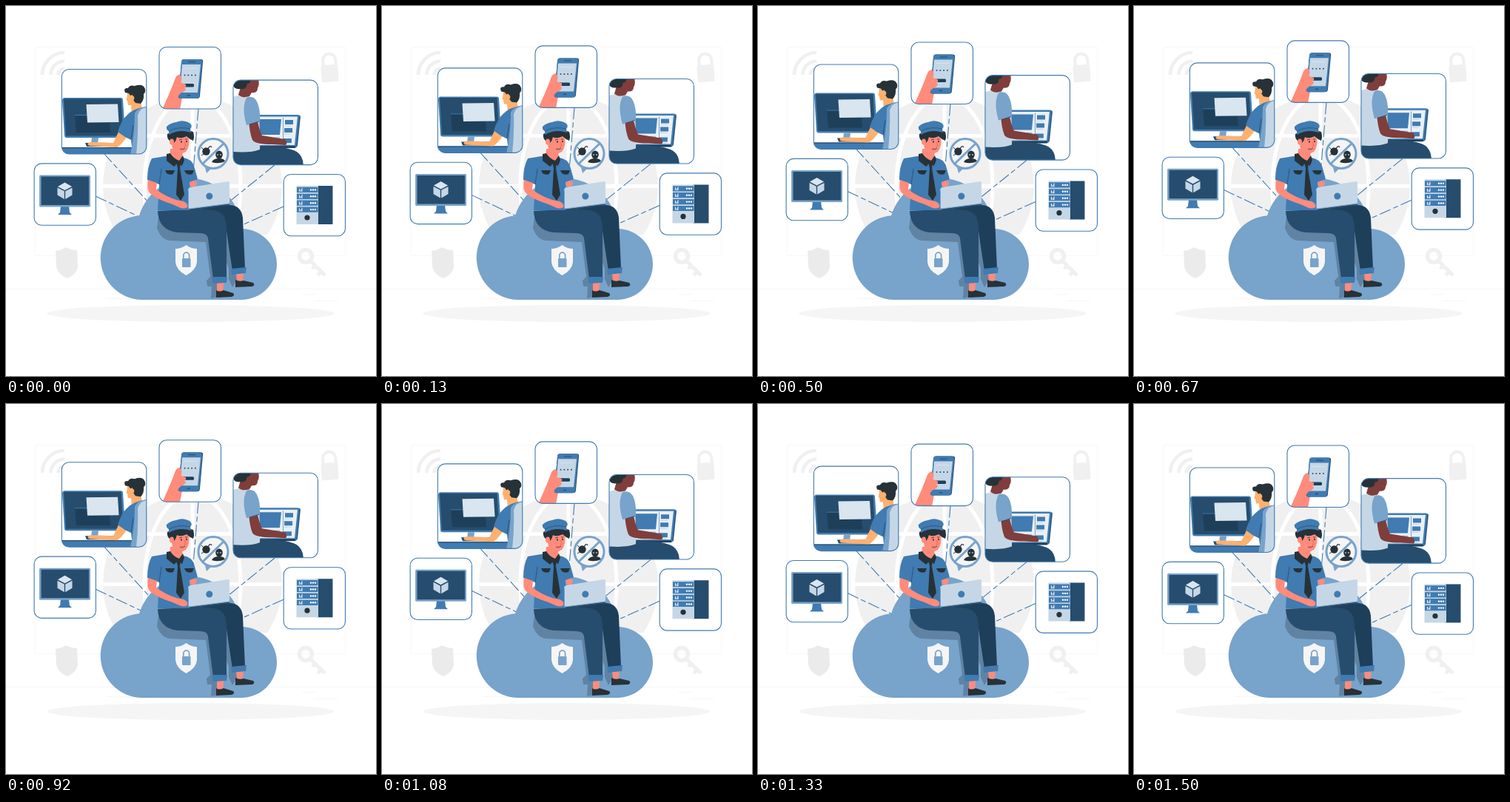
Animation, 500 px wide and 500 px high, one loop 1.54 s. Source, as an HTML page with a canvas:

```html
<!DOCTYPE html>
<html lang="en">
<head>
<meta charset="utf-8">
<style>
html, body { margin: 0; width: 100%; height: 100%; overflow: hidden; background: #fff; }
canvas { display: block; width: 500px; height: 500px; }
</style>
</head>
<body>
<canvas id="stage" width="500" height="500"></canvas>
<script>
const ctx = document.getElementById('stage').getContext('2d');
const LOOP = 1540, FRAME = 1000 / 24, RISE = 10, PEAK = 720;
const blue = '#407bb1', sky = '#78a3ca', pale = '#c5d7e6', mist = '#d9e5ef', navy = '#264d6d', deep = '#1e3f5a';
const ink = '#263238', skin = '#ff8b7b', tan = '#ffb06f', brown = '#7f3e3b', gray = '#ebebeb', faint = '#f0f0f0';

function fill(color, d) {
  ctx.fillStyle = color;
  ctx.fill(new Path2D(d));
}
function line(color, width, d, dash = []) {
  ctx.strokeStyle = color;
  ctx.lineWidth = width;
  ctx.setLineDash(dash);
  ctx.stroke(new Path2D(d));
}
function rect(color, x, y, w, h, r = 0) {
  ctx.fillStyle = color;
  ctx.beginPath();
  ctx.roundRect(x, y, w, h, r);
  ctx.fill();
}
function oval(color, x, y, rx, ry = rx) {
  ctx.fillStyle = color;
  ctx.beginPath();
  ctx.ellipse(x, y, rx, ry, 0, 0, Math.PI * 2);
  ctx.fill();
}
function ring(color, width, x, y, rx, ry = rx) {
  ctx.strokeStyle = color;
  ctx.lineWidth = width;
  ctx.setLineDash([]);
  ctx.beginPath();
  ctx.ellipse(x, y, rx, ry, 0, 0, Math.PI * 2);
  ctx.stroke();
}

function globe() {
  ctx.save();
  ctx.beginPath();
  ctx.arc(252, 243, 121, 0, Math.PI * 2);
  ctx.clip();
  rect(faint, 130, 120, 244, 244);
  line('#fff', 5, 'M252 120V366M130 243.5H374M130 175.5H374M130 311.5H374');
  ring('#fff', 5, 252, 243, 65, 121);
  ctx.restore();
}

function backdrop() {
  rect('#fff', 0, 0, 500, 500);
  line('#f8f8f8', 1, 'M39.5 55.5H458.5V337.5H39.5Z');
  line('#f6f6f6', 1, 'M0 382.5H500');
  line('#f6f6f6', 1, 'M135 395.5H180M400 389.5H419M416 398.5H448');
  oval('#f5f5f5', 249.5, 415.5, 194, 11.5);

  for (const r of [30, 18.5, 8.5])
    line(faint, 4.5, `M${79 - r} 93A${r} ${r} 0 0 1 79 ${93 - r}`);

  ctx.save();
  ctx.translate(437.5, 91);
  ctx.rotate(-0.07);
  rect(faint, -11.5, -11.5, 23, 23, 2);
  line(faint, 4, 'M-8 -10V-18A8.5 8.5 0 0 1 9 -18V-10');
  ctx.restore();

  fill(gray, 'M67 331Q75 330 81 326Q88 330 96 330L97 352Q96 362 83 368Q69 362 68 352Z');
  ring(faint, 5.5, 405, 338, 8.5);
  line(faint, 5, 'M411 344L431 364M418 351L414 355M426 359L421 364');
  globe();
}

function links() {
  const dash = [16, 4, 7, 4];
  line(blue, 1.1, 'M260 139L252 236', dash);
  line(blue, 1.1, 'M132 199L214 289', dash);
  line(blue, 1.1, 'M121 257L210 299', dash);
  line(blue, 1.1, 'M363 215L280 282', dash);
  line(blue, 1.1, 'M375 271L290 309', dash);
}

function panel(x, y, size, r, content) {
  const box = new Path2D();
  box.roundRect(x + .5, y + .5, size, size, r);
  ctx.fillStyle = '#fff';
  ctx.fill(box);
  ctx.save();
  ctx.clip(box);
  content();
  ctx.restore();
  ctx.strokeStyle = blue;
  ctx.lineWidth = 1.1;
  ctx.setLineDash([]);
  ctx.stroke(box);
}

function phone() {
  fill(skin, 'M211 140L219 122Q225 108 229 97Q232 92 236 93L239 106L243 114L238 124L235 140Z');
  fill(navy, 'M241 72H263Q267 72 266 76L262 121Q262 125 258 125H236Q232 125 233 121L237 76Q237 72 241 72Z');
  fill(blue, 'M240 72H262Q265 72 265 76L261 121Q261 125 257 125H236Q232 125 233 121L237 76Q237 72 240 72Z');
  fill(pale, 'M238 79H263L259 117H235Z');
  line(navy, 1, 'M246 75.5H256');
  line(navy, 1.3, 'M245 121H249');
  line(mist, 1, 'M241 84H258');
  for (let i = 0; i < 4; i++) oval(navy, 241.5 + i * 4.8, 93.5, 1);
  rect(deep, 239, 105, 15, 4.5, 1.5);
  fill(skin, 'M228 101Q231 92 236 94Q239 98 236 103L243 106Q244 109 241 110L243 112Q242 116 237 117L232 122Z');
}

function deskWorker() {
  rect(blue, 75, 191, 115, 10);
  line(deep, 1, 'M75 191.5H190');
  fill(blue, 'M79 124H155Q158 124 158 127L161 174Q161 178 157 178H82Q79 178 79 175L76 128Q76 124 79 124Z');
  fill(navy, 'M78 125.5H155.5L158.5 175.5H81Z');
  fill(deep, 'M93 147H139L141 171H95Z');
  line(blue, 1, 'M93 147.5H112');
  fill(mist, 'M108.5 133L151 132.5L152.5 157L110 157.5Z');
  fill(sky, 'M116 178H125L124 186H115Z');
  fill(navy, 'M107 185H149V190H109Z');
  fill(tan, 'M153 168L165 174Q157 187 150 191L113 189Q108 187 113 184L123 184L145 185Z');
  fill(tan, 'M164 117L163.5 123L162.5 127L164 128L165 134H169L170 147L184 140L180 117Z');
  fill(blue, 'M163 148Q172 138 190 136V200H171L169 181L161 177L151 170Q156 154 163 148Z');
  line(deep, .7, 'M169 180L172 161');
  fill(ink, 'M161 117Q158 110 165 111Q167 106 174 108Q185 104 188 112Q189 117 186 119Q187 127 182 132L175 131L172 127L171 120L168 121L166 118Z');
  oval(tan, 171, 124.5, 2.3, 3);
  fill(sky, 'M174 145Q179 136 191 136V201H168Q174 174 174 145Z');
  fill(pale, 'M178 148Q181 137 191 137V201H176Q179 174 178 148Z');
}

function laptopWorker() {
  fill(blue, 'M343 147H394Q398 147 398 150L394 189Q393 192 389 192H341Z');
  line(navy, 1, 'M397 149L393 189');
  fill('#e9f0f6', 'M341 149.5H394L390 188H340Z');
  fill(blue, 'M342 153H372L370 174H341Z');
  line(sky, 1, 'M374.5 151V187');
  for (const y of [154, 165, 179]) {
    const x = 377 - (y - 154) / 12;
    rect(blue, x, y, 11, 6);
    line(pale, 1, `M${x - 1} ${y + 8}h10`);
  }
  line(sky, 2.5, 'M363 178.5H370', [1.5, 1]);
  line(deep, 2.5, 'M345 190.5H391');
  fill(navy, 'M305 193Q326 187 354 190Q380 190 393 197Q402 203 402 217H305Z');
  fill(pale, 'M306 123Q317 119 328 122L340 133Q344 162 343 194Q330 199 306 197Z');
  fill(brown, 'M319 103Q329 93 341 99Q343 107 340 111Q340 118 332 117L329 122Q319 125 314 120Z');
  fill(ink, 'M306 97H331Q331 103 328 105Q325 104 325 109Q322 113 317 112Q308 113 307 107Z');
  fill(brown, 'M328 153L339 151Q342 167 346 175L377 180Q381 185 378 188L360 187Q337 187 333 181Q329 171 328 153Z');
  fill(sky, 'M325 124Q334 120 339 129Q344 139 343 156L325 161Q318 137 325 124Z');
  line(deep, .7, 'M329 160L342 156');
}

function monitor() {
  fill(blue, 'M74 270H85L86 279L89 282H70L73 279Z');
  rect(sky, 45, 228.5, 69, 43, 1.5);
  rect(navy, 47.5, 230.5, 64.5, 38.5);
  fill(mist, 'M79.5 238.5L89 244L79.5 249L70 244Z');
  fill(pale, 'M69.5 245.5L78.8 250.3V261L69.5 255.5Z');
  fill(pale, 'M89.5 245.5L80.2 250.3V261L89.5 255.5Z');
}

function server() {
  rect(navy, 420, 243, 21.5, 52);
  rect(pale, 392.5, 243, 29.5, 52);
  for (let i = 0; i < 4; i++) {
    const y = 244.8 + i * 8.9;
    rect(blue, 393, y, 28.5, 7.2);
    line('#fff', 1, `M396.5 ${y + 2}v4M398.5 ${y + 3.5}v2.5M400 ${y + 1.3}v4.7`);
    for (let j = 0; j < 3; j++) oval('#fff', 412 + j * 3, y + 3.6, 1.2);
  }
  oval(ink, 407, 286, 3.6);
}

function cloud() {
  fill(sky, 'M184 397A57 57 0 0 1 180 283.2A70.5 70.5 0 0 1 318 301A48 48 0 0 1 318 397Z');
  fill('#6083a3', 'M207 278L204 300Q209 315 221 317L270 319L276 366L271 371L272 379H278L277 395L288 393L292 330L301 355V369L306 380L312 370L300 292Z');
  fill('#f5f5f5', 'M229 328Q237 328 243.5 323Q250 328 258 328V346Q257 357 243.5 364Q230 357 229 346Z');
  line(sky, 1.7, 'M239.8 342V337A3.9 3.9 0 0 1 247.6 337V342');
  rect(sky, 238, 341, 11.5, 12, 1);
}

function bubble() {
  fill(sky, 'M268 214L271 226L280 217Z');
  oval('#f5f5f5', 280, 199.5, 20);
  oval(ink, 270.5, 196.5, 5.2);
  line(ink, 1.3, 'M273 193L275 190Q277 189 278 191');
  line(ink, 1, 'M264 191L267 194M264 202L267 200');
  oval(ink, 288, 201, 4.8, 5.5);
  fill(ink, 'M278 211Q280 206 288 206Q295 206 296 210Q287 214 278 211Z');
  line('#fff', 1, 'M285 201H287M289 201H291');
  line(sky, 3, 'M294.5 185.5L265.5 213.5');
  ring(sky, 3, 280, 199.5, 20);
}

function officer() {
  // Far leg, then near leg
  fill(skin, 'M311 358H321L320 373H312Z');
  fill(ink, 'M310 370Q315 373 321 371L334 374Q337 377 333 379L310 380Z');
  fill(deep, 'M262 272L303 269Q318 270 320 286L323 355L306 358L298 304Z');
  fill(blue, 'M304 355L325 353L324 361L305 363Z');
  fill(skin, 'M285 370H295L293 386H285Z');
  fill(ink, 'M284 384Q288 387 294 384L307 388Q310 391 305 393L284 394Z');
  fill(navy, 'M205 277L246 275Q284 273 292 281Q298 287 298 302L298 368L280 369L273 314Q272 307 262 307L232 306Q206 303 205 277Z');
  fill(blue, 'M278 366L299 366L298 374L280 375Z');
  // Torso
  fill(skin, 'M246 241L249 236Q255 234 258 239L255 246Z');
  fill(blue, 'M197 206L221 202L240 205Q251 207 254 216L259 234L248 238L249 268L244 276H205L207 241L191 235Q191 217 197 206Z');
  line(deep, .6, 'M207 241L210 220');
  fill(skin, 'M222 193L239 192L238 207L231 212L221 205Z');
  fill(ink, 'M217 200L222 199Q226 206 234 209L239 202L241 208L238 216L232 212L227 217L217 209Z');
  fill(ink, 'M230 211L236 212L235 219L241 255L236 263L230 255L232 219Z');
  fill(ink, 'M215 222H228L226 227Q221 229 217 226ZM241 222H254L252 227Q247 229 243 226Z');
  // Laptop and arm
  line(blue, 2, 'M220 275H249');
  fill(navy, 'M247 274L302 267V269L249 277Z');
  fill(pale, 'M249 245L300 237Q302 237 302 239V267L248 274Q246 274 246 272V248Q247 246 249 245Z');
  line(sky, 1, 'M246.5 249V272Q246 274 248 274L302 267');
  oval(blue, 274.8, 257, 4.5);
  fill(skin, 'M192 235L204 239L203 248Q215 257 230 262L240 264Q247 267 245 272Q241 275 234 272L225 268Q200 260 193 251Q190 246 192 235Z');
  // Head
  fill(skin, 'M224 174Q236 170 247 176Q249 190 243 197Q235 202 227 196Q222 189 224 174Z');
  fill(ink, 'M218 173Q235 164 253 170Q255 177 253 182Q248 180 244 176Q236 180 231 177Q230 182 227 185L222 183Q217 179 218 173Z');
  oval(skin, 224, 183.5, 3, 4);
  oval(ink, 237, 183.5, .9, 1.2);
  oval(ink, 244, 183, .9, 1.2);
  line(ink, .8, 'M234 181L238 180M242 180H245M235 193Q239 195 242 192');
  line('#e4655b', .8, 'M241 184L243 189L240 190');
  fill(blue, 'M217 163Q222 158 230 157Q239 153 248 158Q253 162 249 166L250 171Q234 166 220 174L220 169Q216 167 217 163Z');
  line(navy, .7, 'M220 169Q234 162 249 166');
}

function draw(now) {
  const t = Math.floor((now % LOOP + 5) / FRAME) * FRAME;
  const fromPeak = Math.abs((t - PEAK + LOOP * 1.5) % LOOP - LOOP / 2);
  const lift = RISE * (1 - fromPeak / (LOOP / 2));

  backdrop();
  ctx.save();
  ctx.translate(0, .65 - lift);
  links();
  ctx.restore();
  cloud();
  ctx.save();
  ctx.translate(0, .65 - lift);
  panel(206.5, 55, 83.5, 10, phone);
  panel(74.8, 85, 114.5, 10, deskWorker);
  panel(306.5, 99.6, 114.5, 10, laptopWorker);
  panel(37.6, 212.4, 83.3, 10, monitor);
  panel(374.7, 227, 83.3, 10, server);
  ctx.restore();
  bubble();
  officer();
}

const start = performance.now();
function tick() {
  draw(performance.now() - start);
  requestAnimationFrame(tick);
}
tick();
</script>
</body>
</html>
```
